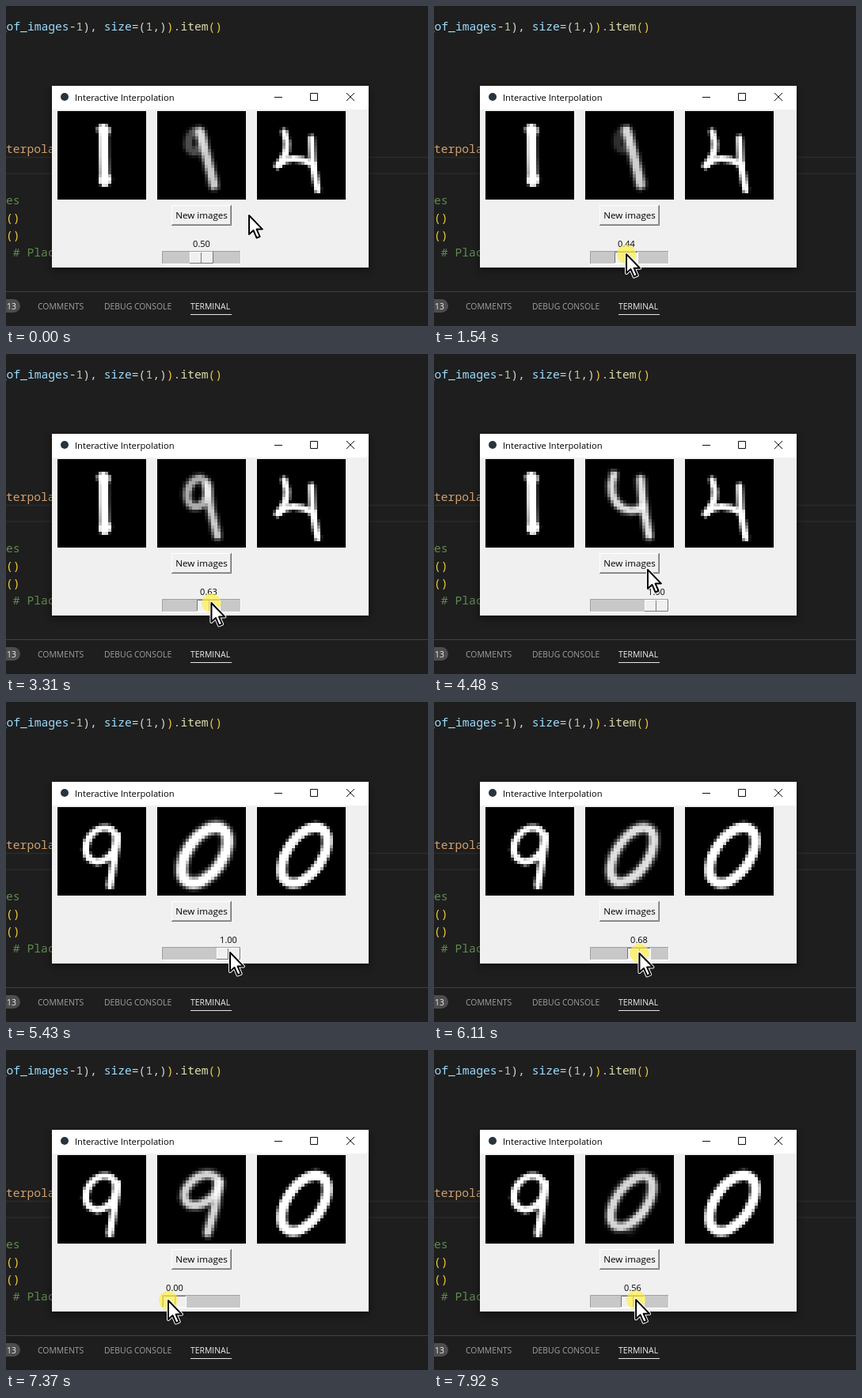
An HTML page with a canvas for the animation above (7990 ms loop, 533x405 px).

```html
<!DOCTYPE html>
<html lang="en">
<head>
<meta charset="utf-8">
<title>Interactive Interpolation</title>
<style>
  html, body { margin: 0; width: 100%; height: 100%; overflow: hidden; background: #1e1e1e; }
  #stage { position: relative; width: 533px; height: 405px; overflow: hidden; }
  svg { position: absolute; left: 0; top: 0; }
  canvas { position: absolute; top: 133px; width: 112px; height: 112px; background: #000; image-rendering: pixelated; }
  .code { font: 500 14.67px "Noto Sans Mono", monospace; fill: #d4d4d4; }
  .ui { font-family: "Open Sans", sans-serif; }
  .tab { font-size: 10.4px; fill: #a0a0a0; }
  .tab .on { fill: #f0f0f0; }
  .var { fill: #9cdcfe; } .num { fill: #b5cea8; } .fn { fill: #dcdcaa; }
  .par { fill: #f0c838; } .str { fill: #d0a070; } .note { fill: #608b4e; }
  .bevel { --lit: #fff; --dark: #737373; fill: none; }
  .bevel.down { --lit: #737373; --dark: #fff; }
  .lit { stroke: var(--lit); } .dark { stroke: var(--dark); }
</style>
</head>
<body>
<div id="stage">
  <svg width="533" height="405" viewBox="0 0 533 405">
    <defs>
      <filter id="soft" x="-10%" y="-10%" width="120%" height="120%"><feGaussianBlur stdDeviation="5"/></filter>
    </defs>
    <rect width="533" height="405" fill="#1e1e1e"/>
    <path d="M0 191.5H533M0 212H533" stroke="#2b2b2b" stroke-width="1.5"/>
    <g class="code">
      <text x="-8.3" y="31"><tspan class="var">_of_images</tspan>-<tspan class="num">1</tspan>), <tspan class="var">size</tspan>=(<tspan class="num">1</tspan>,)<tspan class="par">)</tspan>.<tspan class="fn">item</tspan><tspan class="par">()</tspan></text>
      <text x="0" y="186" class="str">terpolation</text>
      <text x="0" y="251" class="note">es</text>
      <text x="0" y="273" class="par">()</text>
      <text x="0" y="295" class="par">()</text>
      <text x="8.8" y="317" class="note"># Place</text>
    </g>
    <path d="M0 361.5H533" stroke="#414141"/>
    <rect x="-10" y="371" width="28" height="17" rx="8.5" fill="#4d4d4d"/>
    <g class="ui tab">
      <text x="1" y="384" class="on">13</text>
      <text x="40" y="384">COMMENTS</text>
      <text x="124" y="384">DEBUG CONSOLE</text>
      <text x="233" y="384" class="on">TERMINAL</text>
    </g>
    <path d="M233 390.5H285" stroke="#e7e7e7"/>

    <rect x="57" y="104" width="402" height="231" fill="#000" opacity=".4" filter="url(#soft)"/>
    <rect x="58" y="101" width="400" height="230" fill="#f0f0f0"/>
    <rect x="58" y="101" width="400" height="30" fill="#fff"/>
    <circle cx="74" cy="115" r="5" fill="#26343f"/>
    <text class="ui" x="87" y="120" font-size="11.2">Interactive Interpolation</text>
    <path d="M339 115.5H349M384.5 110.5h9v9h-9zM430 110l10 10M440 110l-10 10" fill="none" stroke="#111"/>

    <g id="button" class="bevel">
      <path class="lit" d="M209.5 277V252.5H284"/>
      <path d="M210 276.5H283.5V253" stroke="#a0a0a0"/>
      <path class="dark" d="M209 277.5H284.5V252"/>
    </g>
    <text class="ui" x="247" y="269" font-size="11.6" text-anchor="middle">New images</text>

    <rect x="197" y="310" width="100" height="16" fill="#c8c8c8"/>
    <path d="M197.5 326V310.5H296" fill="none" stroke="#a0a0a0"/>
    <path d="M197 326.5H296.5V310" fill="none" stroke="#fff"/>
    <g id="thumb" class="bevel">
      <rect y="311" width="30" height="15" fill="#f0f0f0"/>
      <path class="lit" d="M.5 325V311.5H29M15.5 312V325"/>
      <path class="dark" d="M0 325.5H29.5V311M14.5 312V325"/>
      <text id="value" class="ui" x="15" y="305" font-size="11" text-anchor="middle" fill="#000">0.50</text>
    </g>
  </svg>
  <canvas id="left" width="28" height="28" style="left:65px"></canvas>
  <canvas id="mid" width="28" height="28" style="left:191px"></canvas>
  <canvas id="right" width="28" height="28" style="left:317px"></canvas>
  <svg width="533" height="405" viewBox="0 0 533 405">
    <g id="pointer" stroke-linejoin="round">
      <circle id="press" r="12" fill="#fff03c" opacity=".66"/>
      <path id="arrow" d="M0 0V24L5.5 19L9.6 28.5L13.7 26.8L9.6 17.6H17Z" fill="#fff" stroke="#fff" stroke-width="4"/>
      <use href="#arrow" style="display:none"/>
      <path d="M0 0V24L5.5 19L9.6 28.5L13.7 26.8L9.6 17.6H17Z" fill="#fff" stroke="#000" stroke-width="2"/>
    </g>
  </svg>
</div>
<script>
const LOOP = 7990, SWAP = 4880, LAG = 22;
const $ = id => document.getElementById(id);

// pointer path: time, x, y
const path = [
  [70, 307, 265], [340, 252, 271], [870, 252, 271], [1210, 248.3, 314], [1430, 248.3, 314],
  [2500, 197.5, 315], [2700, 197.5, 315], [3600, 288.7, 315], [3660, 295, 315], [4050, 295, 315],
  [4270, 288, 307], [4480, 270, 273], [4690, 263, 268], [5150, 263, 268], [5430, 283, 317],
  [5560, 283, 318], [6088, 260.5, 318], [6788, 228.6, 317], [7260, 205, 317], [7430, 205, 317],
  [7570, 213.5, 317], [LOOP, 263.3, 316]
];
const drags = [[1210, 4150], [5480, LOOP]];
const click = [4690, SWAP];

// A digit is a loop (cx, cy, long and short radius, tilt, from, to, tone),
// a stem (start, bend, end, tone) and a line width.
const digit = (loop, stem, width) => [loop, stem, [width]];
const FULL = 6.3;
const nine = digit([13.8, 11.9, 5.8, 4.4, .6, 0, FULL, 1], [19, 9, 18.2, 16, 16.5, 25, 1], 2.2);
const zero = digit([15, 15.2, 10, 5.6, .6, 0, FULL, 1], [20, 10, 19, 18, 13, 23, 0], 3.1);

// latent steps: slider value and the digit seen there
const oneToFour = [
  [0, digit([14, 8, 2, 1, 0, 0, FULL, 0], [14.5, 5.5, 14.7, 14, 15, 22.8, 1], 3.2)],
  [.47, digit([12, 9.3, 3, 2, .2, 0, FULL, .16], [12.9, 6.2, 15, 12, 17.7, 23.2, .74], 2.5)],
  [.63, digit([12.8, 10.6, 4.5, 3.2, .3, 0, FULL, .6], [15.6, 8.3, 16.4, 15, 19, 24.3, .74], 2.1)],
  [1, digit([15.4, 8, 8.3, 7, .35, 1.5, 3.95, .82], [17.5, 6.4, 17.8, 15, 20.2, 24.3, .85], 2.1)]
];
const nineToZero = [
  [.3, digit([13.9, 11, 6.1, 4, .9, 0, FULL, .78], [19.7, 8.5, 18.8, 16, 15.9, 24.6, .78], 2.2)],
  [.6, digit([14.8, 15.2, 9.7, 5, .58, 0, FULL, .8], [20.5, 9, 20, 18, 14, 24, 0], 2.4)],
  [1, zero]
];

const clamp = (n, lo = 0, hi = 1) => Math.min(hi, Math.max(lo, n));
const mix = (a, b, k) => Array.isArray(a) ? a.map((n, i) => mix(n, b[i], k)) : a + (b - a) * k;
const within = (t, [from, to]) => t >= from && t < to;

function sample(rows, t) {
  const i = clamp(rows.findIndex(r => r[0] >= t), 1, rows.length - 1);
  const a = rows[i - 1], b = rows[i];
  return mix(a, b, clamp((t - a[0]) / (b[0] - a[0])));
}

// the thumb follows the pointer only while it is held
function valueAt(t) {
  const drag = drags.filter(d => d[0] <= t).pop();
  if (!drag) return .5;
  const x = sample(path, Math.min(t, drag[1]) - LAG)[1];
  return clamp((x - 214.3) / 68);
}

function clear(id) {
  const ctx = $(id).getContext("2d");
  ctx.globalAlpha = 1;
  ctx.clearRect(0, 0, 28, 28);
  ctx.strokeStyle = "#fff";
  ctx.lineCap = "round";
  return ctx;
}

function ink(ctx, width, tone, glow) {
  for (const [w, alpha] of [[width + 1.8, tone * glow], [width, tone]]) {
    ctx.lineWidth = w;
    ctx.globalAlpha = alpha;
    ctx.stroke();
  }
}

function drawStem(ctx, [x0, y0, bx, by, x1, y1, tone = 1], width, glow = 0) {
  ctx.beginPath();
  ctx.moveTo(x0, y0);
  ctx.quadraticCurveTo(bx, by, x1, y1);
  ink(ctx, width, tone, glow);
}

function drawDigit(ctx, [loop, stem, [width]], glow = 0) {
  const [cx, cy, a, b, tilt, from, to, tone] = loop;
  ctx.beginPath();
  ctx.ellipse(cx, cy, a, b, tilt - Math.PI / 2, -from, -to, true);
  ink(ctx, width, tone, glow);
  drawStem(ctx, stem, width, glow);
}

function drawOne(ctx) {
  drawStem(ctx, [14.6, 6, 14.6, 14, 14.9, 22], 3);
  drawStem(ctx, [14.4, 5.9, 14.5, 6, 14.8, 6.1], 3.8);
  drawStem(ctx, [14.9, 22, 15, 21.9, 15.2, 21.7], 3.8);
}

function drawFour(ctx) {
  drawStem(ctx, [8.6, 6.5, 11, 13, 6.6, 17.2], 2);
  drawStem(ctx, [6.6, 17.2, 10.5, 12.8, 18, 17], 2);
  drawStem(ctx, [17.2, 8.5, 17, 16, 19.2, 25], 2);
}

let swapped = null;
function drawPair(second) {
  if (swapped === second) return;
  swapped = second;
  const left = clear("left"), right = clear("right");
  if (second) {
    drawDigit(left, nine);
    drawDigit(right, zero);
  } else {
    drawOne(left);
    drawFour(right);
  }
}

function render(t) {
  const [, x, y] = sample(path, t);
  const v = valueAt(t);
  const dragging = drags.some(d => within(t, d));
  const clicking = within(t, click);

  drawPair(t >= SWAP);
  drawDigit(clear("mid"), sample(t >= SWAP ? nineToZero : oneToFour, v)[1], .3);

  $("thumb").setAttribute("transform", `translate(${Math.round(198 + 68 * v)} 0)`);
  $("thumb").classList.toggle("down", dragging);
  $("button").classList.toggle("down", clicking);
  $("value").textContent = v.toFixed(2);
  $("pointer").setAttribute("transform", `translate(${x} ${y})`);
  $("press").style.display = dragging || clicking ? "" : "none";
}

function tick() {
  render(performance.now() % LOOP);
  requestAnimationFrame(tick);
}
tick();
</script>
</body>
</html>
```
